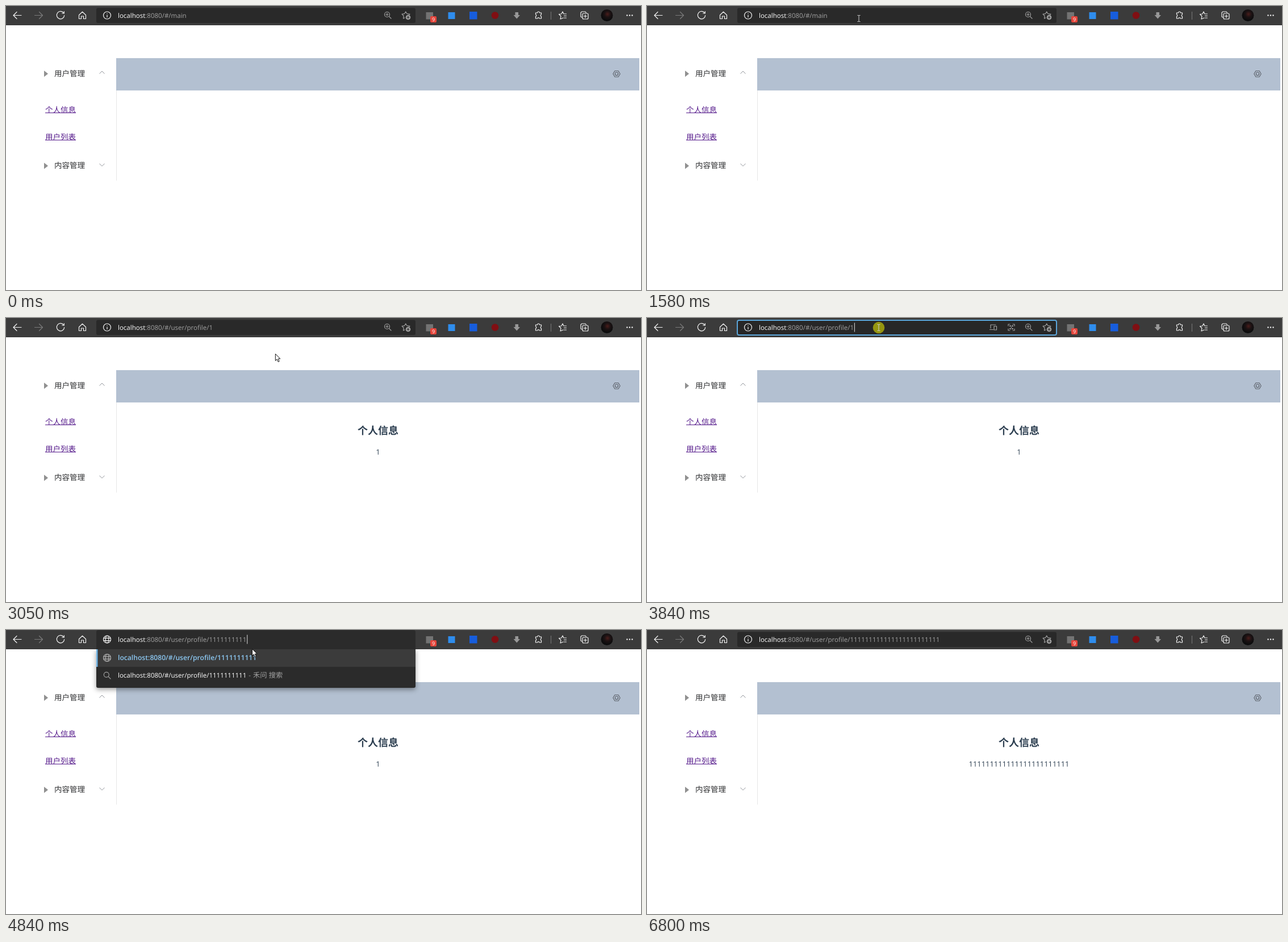
An HTML page for the animation above (7 s loop, 1118 by 501 pixels).

```html
<!DOCTYPE html>
<html lang="zh">
<head>
<meta charset="utf-8">
<title>User pages</title>
<style>
  html, body { margin: 0; width: 100%; height: 100%; overflow: hidden; background: #fff; }
  svg { display: block; }
  text { font-family: "Open Sans", "Noto Sans CJK SC", "Noto Sans CJK", sans-serif; text-rendering: geometricPrecision; white-space: pre; }
  .url { font-size: 11.53px; fill: #a3a3a3; }
  .white { fill: #fff; }
  .bold { font-size: 12.15px; font-weight: 600; fill: #8cc8f2; }
  .menu { font-size: 13.5px; fill: #303133; }
  .link { font-size: 13.5px; fill: #551a8b; }
  .icon { fill: none; stroke: #f2f2f2; stroke-width: 1.2; stroke-linecap: round; stroke-linejoin: round; }
  .dim { stroke: #a0a0a0; }
  .off { stroke: #7b7b7b; }
  #list { filter: drop-shadow(0 3px 4px rgba(0, 0, 0, .4)); }
</style>
</head>
<body>
<svg width="1118" height="501" viewBox="0 0 1118 501">
  <defs>
    <radialGradient id="photo" cx=".55" cy=".4">
      <stop offset="0" stop-color="#4a1d1b"/><stop offset=".5" stop-color="#1c1213"/><stop offset="1" stop-color="#0c0c0d"/>
    </radialGradient>
    <g id="globe" class="icon">
      <circle r="6.5"/><ellipse rx="2.9" ry="6.5"/><path d="M-6 -2.2H6M-6 2.2H6"/>
    </g>
  </defs>
  <rect width="1118" height="501" fill="#fff"/>

  <g id="page">
    <path d="M194.5 92V308" stroke="#e6e6e6"/>
    <rect x="194" y="92" width="921" height="57" fill="#b3c0d1"/>
    <g fill="none" stroke="#5b6069" stroke-width="1.1" stroke-linejoin="round">
      <path d="M1071.9 114.5H1078.1L1081.2 119.7L1078.1 125H1071.9L1068.8 119.7Z"/>
      <circle cx="1075" cy="119.7" r="2.7"/>
    </g>
    <path d="M67 114L74 119.5L67 125ZM67 276.5L74 282L67 287.5Z" fill="#909090"/>
    <path d="M164.5 119.5L169 115L173.500 119.5M164.500 278L169 282.500L173.500 278" fill="none" stroke="#909399"/>
    <text class="menu" x="85" y="123.500">用户管理</text>
    <text class="link" x="69" y="187.500">个人信息</text>
    <text class="link" x="69" y="235.500">用户列表</text>
    <path d="M69 188.500H123M69 236.500H123" stroke="#551a8b"/>
    <text class="menu" x="85" y="285.500">内容管理</text>
    <g id="profile" fill="#2c3e50" text-anchor="middle">
      <text x="655" y="205" font-size="18" font-weight="700">个人信息</text>
      <text id="userId" x="655" y="241.300" font-size="12.9"></text>
    </g>
  </g>

  <rect width="1118" height="34" fill="#3b3b3b"/>
  <g class="icon">
    <path d="M27 16.500H13M19 10.500L13 16.500L19 22.500"/>
    <path class="off" d="M50.500 16.500H64.500M58.500 10.500L64.500 16.500L58.500 22.500"/>
    <path id="reload" d="M101.500 12.300A6.700 6.700 0 1 0 102.700 16.500M102.300 9.500V13H98.700"/>
    <path id="stop" d="M91 11.500L101 21.500M101 11.500L91 21.500"/>
    <path d="M128.500 16L134.500 10.300L140.500 16V22.500H136.500V18H132.500V22.500H128.500Z"/>
  </g>

  <rect x="739.500" y="11" width="12.500" height="12.500" fill="#737373"/>
  <rect x="747" y="18" width="11" height="11" rx="2" fill="#e5443a"/>
  <text x="752.500" y="26.800" font-size="9" text-anchor="middle" fill="#fff">9</text>
  <rect x="778.500" y="11" width="12" height="12" fill="#2f8ded"/>
  <rect x="816" y="10" width="13.500" height="13.500" fill="#175ddc"/>
  <circle cx="861" cy="16.500" r="6.300" fill="#800f13"/>
  <path d="M896.500 11H902V16H905L899.300 22.500L893.500 16H896.500Z" fill="#989898"/>
  <path d="M959.500 10V24" stroke="#777"/>
  <g class="icon">
    <path d="M932.500 12H935.500A2 2 0 0 1 939.500 12H942.500V14.800A2 2 0 0 0 942.500 18.500V22H939.300A1.900 1.900 0 0 0 935.600 22H932.500V18.500A2 2 0 0 0 932.500 14.800Z"/>
    <path d="M981 21L976 23L977 18L973.500 14.500L978 14L980 10L982 14H986.500M982.500 17.500H986.500M982.500 21H986.500"/>
    <path d="M1014 20L1012 19V11.500L1014 10H1020L1021.500 12"/>
    <rect x="1015" y="13" width="10" height="10" rx="2"/>
    <path d="M1020 15.500V20.500M1017.500 18H1022.500"/>
  </g>
  <circle cx="1058" cy="16.500" r="10.500" fill="url(#photo)"/>
  <g fill="#f2f2f2"><circle cx="1093.500" cy="16.500" r="1.200"/><circle cx="1098" cy="16.500" r="1.200"/><circle cx="1102.500" cy="16.500" r="1.200"/></g>

  <g id="list">
    <path d="M159 34H721V99Q721 102 718 102H162Q159 102 159 99Z" fill="#2b2b2b"/>
    <rect x="159" y="34" width="562" height="31" fill="#3b3b3b"/>
    <rect x="159" y="34" width="2.500" height="31" fill="#6fb5e8"/>
    <use href="#globe" x="178" y="49" opacity=".65"/>
    <path class="icon dim" d="M180.300 82.300L184 86"/>
    <circle class="icon dim" cx="176.800" cy="78.800" r="4.500"/>
    <text id="match" class="bold" x="197" y="53"></text>
    <text class="url" x="197" y="84.300"><tspan id="query" class="white"></tspan><tspan dx="4">-</tspan><tspan dx="4" font-size="12.300">禾问 搜索</tspan></text>
  </g>

  <rect id="bar" x="159" y="3.500" width="562" height="26.500" rx="3" fill="#292929"/>
  <path id="openBar" d="M159 34V4Q159 0 163 0H717Q721 0 721 4V34Z" fill="#2b2b2b"/>
  <rect id="ring" x="159" y="4" width="562" height="26" rx="3" fill="#272727" stroke="#5ba6da" stroke-width="2"/>
  <g id="info" class="icon"><circle cx="178" cy="16.500" r="6.500"/><path d="M178 16V19.700M178 13.300V13.400"/></g>
  <use id="site" href="#globe" x="178" y="16.500"/>
  <g id="tools" class="icon dim">
    <circle cx="671" cy="15" r="4.500"/><path d="M674.300 18.300L678 22M671 12.800V17.200M668.800 15H673.200"/>
    <path d="M702 20.800L699.500 22L700.200 17.500L697 14.300L701.500 13.700L703.700 10L706 13.700L711 14.300L709.500 15.800"/>
    <circle cx="708" cy="20" r="3.700" fill="#a0a0a0"/><path d="M708 18V22M706 20H710" stroke="#292929"/>
  </g>
  <g id="extra" class="icon dim">
    <path d="M605 18V12H614M603.500 20.500H609.500"/><rect x="611" y="14.500" width="4.500" height="6.500"/>
    <path d="M636 14V11H639M644 11H647V14M647 19V22H644M639 22H636V19"/>
    <path d="M639 14H640M643 14H644M639 19H640M643 19H644M641.500 16.500H641.600" stroke-width="2"/>
  </g>
  <rect id="select" x="197" y="7" height="19" fill="#1668b8"/>
  <text class="url" x="197" y="20.500"><tspan class="white">localhost</tspan><tspan id="path"></tspan></text>
  <path id="caret" d="M0 8.500V24.500" stroke="#ddd"/>

  <g id="pointer">
    <circle id="press" r="10.300" fill="#e6e600" fill-opacity=".58"/>
    <path id="beam" d="M-2.500 -5.500H-.6L0 -5L.6 -5.500H2.500M0 -5V5M-2.500 5.500H-.6L0 5L.6 5.500H2.500" fill="none" stroke="#d0d0d0"/>
    <path id="arrow" d="M.500 .500V12.500L3.300 9.900L5.300 14.500L7.300 13.600L5.400 9.100H9Z" fill="#fff" stroke="#111"/>
    <path id="hand" d="M-1.500 9V1Q0 -1 1.500 1V6L8 7.500Q9.500 8 9 11L7.500 17H0L-5 10Q-4 7.500 -1.500 11Z" fill="#fff" stroke="#111"/>
  </g>
</svg>
<script>
const LOOP = 7000, BASE = ":8080/#/";
const ui = {};
document.querySelectorAll("svg [id]").forEach(el => ui[el.id] = el);

// time, x, y
const track = [
  [50, 1032, 463], [250, 820, 310], [450, 500, 115], [590, 380, 27], [660, 373, 22],
  [2030, 373, 22], [2300, 250, 95], [2550, 115, 180], [2650, 103, 187],
  [2780, 103, 187], [2900, 250, 150], [3050, 474, 63], [3250, 440, 30], [3430, 408, 17],
  [4400, 408, 17], [4600, 433, 33],
  [6250, 433, 33], [6450, 620, 180], [6650, 900, 390], [6800, 1045, 505]
];

const within = (t, a, b) => t >= a && t < b;
const show = (el, on) => el.setAttribute("visibility", on ? "visible" : "hidden");

function pointerAt(t) {
  const i = track.findIndex(k => k[0] > t);
  if (i < 1) return track[i < 0 ? track.length - 1 : 0].slice(1);
  const [a, x, y] = track[i - 1], [b, u, v] = track[i];
  const p = (t - a) / (b - a);
  return [x + (u - x) * p, y + (v - y) * p];
}

// A held key: one press, a pause, then steady repeats.
function onesAt(t) {
  if (t < 4090) return 1;
  if (t < 4590) return 2;
  return Math.min(24, 3 + Math.floor((t - 4590) / 35));
}

function drawPointer(t, open) {
  const [x, y] = pointerAt(t);
  const live = within(t, 50, 6800);
  const beam = y < 31 && x > 159 && x < 721;
  const hand = x > 69 && x < 123 && y > 174 && y < 194;
  ui.pointer.setAttribute("transform", `translate(${x} ${y})`);
  show(ui.beam, live && beam);
  show(ui.hand, live && hand);
  show(ui.arrow, live && !beam && !hand);
  show(ui.press, within(t, 660, 760) || within(t, 2620, 2740) ||
    within(t, 3480, 3600) || within(t, 3780, 3930));
  ui.bar.setAttribute("fill", beam && within(t, 1830, 3490) ? "#2f2f2f" : "#292929");
}

function draw(t) {
  const ones = "1".repeat(onesAt(t));
  const onProfile = t >= 2680;
  const route = onProfile ? "user/profile/" + ones : "main";
  const typing = within(t, 4090, 5580);
  const focus = within(t, 660, 1340) || within(t, 3490, 4090);
  const loading = within(t, 1340, 1580);
  const picked = within(t, 760, 1340) || within(t, 3600, 3780);

  show(ui.page, !loading);
  ui.profile.style.display = onProfile ? "" : "none";
  ui.userId.textContent = t < 5580 ? "1" : ones;
  show(ui.reload, !loading);
  show(ui.stop, loading);

  show(ui.ring, focus);
  show(ui.extra, focus);
  show(ui.openBar, typing);
  show(ui.site, typing);
  show(ui.info, !typing);
  show(ui.tools, !typing);

  ui.path.textContent = BASE + route;
  ui.path.setAttribute("fill", picked ? "#fff" : "#a3a3a3");
  show(ui.select, picked);
  ui.select.setAttribute("width", onProfile ? 168 : 121);
  show(ui.caret, within(t, 3780, 5580));
  ui.caret.setAttribute("transform", `translate(${358.8 + ones.length * 6.595} 0)`);

  const fade = typing ? 1 : within(t, 5580, 5630) ? .62 : within(t, 5630, 5680) ? .25 : 0;
  ui.list.style.display = fade ? "" : "none";
  ui.list.style.opacity = fade;
  ui.match.textContent = ui.query.textContent = "localhost" + BASE + route;

  drawPointer(t);
}

const start = performance.now();
function tick() {
  draw((performance.now() - start) % LOOP);
  requestAnimationFrame(tick);
}
tick();
</script>
</body>
</html>
```
